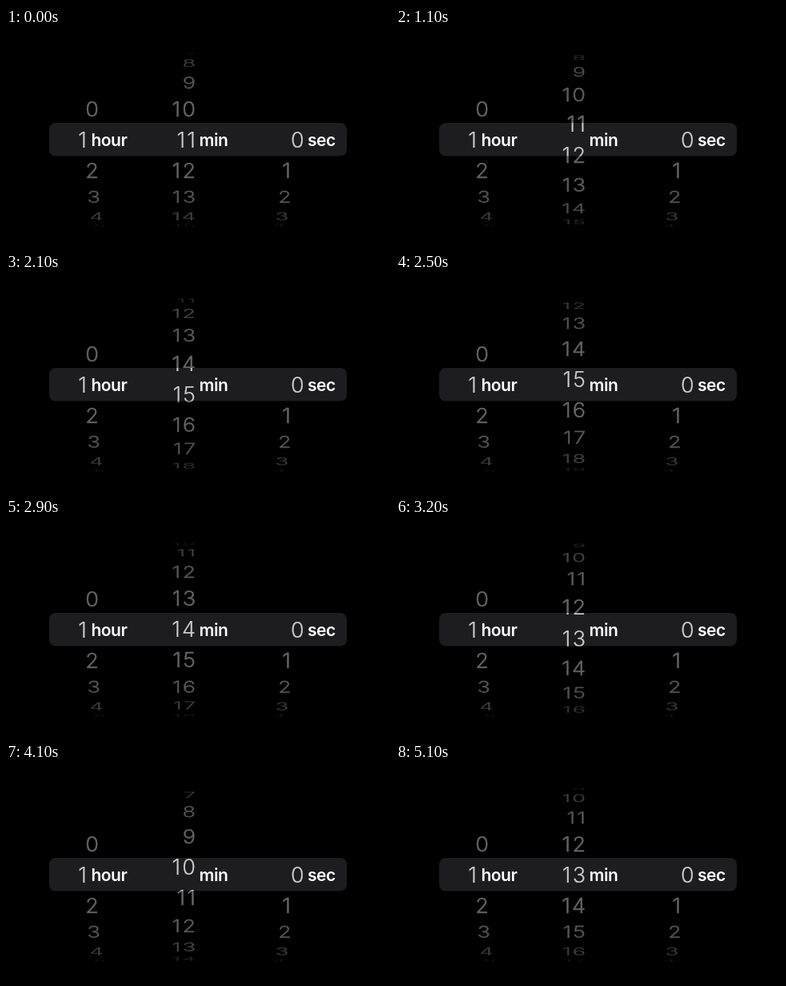
Animation, 480 px wide and 272 px high, one loop 5.2 s. Source, as an HTML page with a canvas:

```html
<!DOCTYPE html>
<html lang="en">
<head>
<meta charset="utf-8">
<title>Timer picker</title>
<style>
  html, body { margin: 0; width: 100%; height: 100%; overflow: hidden; background: #000; }
  canvas { display: block; width: 480px; height: 272px; }
</style>
</head>
<body>
<canvas id="stage" width="480" height="272"></canvas>
<script>
const ctx = document.getElementById('stage').getContext('2d');
const LOOP = 5200, STEP = 100;
const CENTER_Y = 140.2, RADIUS = 108, ROW_ANGLE = 20.9 * Math.PI / 180;
const BAND = { x: 54, y: 119, w: 372, h: 41.5, r: 8 };
const DIGIT_FONT = '300 27px Inter, sans-serif';
const LABEL_FONT = '600 21px Inter, sans-serif';
const DIGIT_GAP = 2.2, BRIGHT = 0.8;

// [time in ms, minute at the middle of the wheel, speed per second]
const scroll = [
  [1000, 11, 5], [1100, 11.5, 4], [1700, 13.26, 3], [2400, 15.25, 0], [2500, 15.18, -1.5],
  [3200, 12.73, -4.5], [3950, 10.05, 0], [4100, 10.26, 4.5], [4600, 13, 0]
];

function minuteAt(time) {
  if (time <= scroll[0][0]) return scroll[0][1];
  const next = scroll.findIndex(key => key[0] >= time);
  if (next < 0) return scroll.at(-1)[1];
  const [t0, p0, v0] = scroll[next - 1], [t1, p1, v1] = scroll[next];
  const span = t1 - t0, u = (time - t0) / span, w = 1 - u;
  return p0 * w * w * (1 + 2 * u) + p1 * u * u * (3 - 2 * u)
    + (v0 * w - v1 * u) * u * w * span / 1000;
}

function drawRow(text, angle, x, align, light) {
  const level = Math.round(255 * light);
  ctx.save();
  ctx.translate(x, CENTER_Y + RADIUS * Math.sin(angle));
  ctx.scale(1, Math.cos(angle));
  ctx.textAlign = align;
  ctx.fillStyle = ctx.strokeStyle = `rgb(${level}, ${level}, ${level})`;
  ctx.lineWidth = light < BRIGHT ? 0.5 : 0.2;
  ctx.fillText(text, 0, 9.8);
  ctx.strokeText(text, 0, 9.8);
  ctx.restore();
}

const dim = angle => 0.41 * Math.cos(angle) ** 0.7;

// Side wheels lean towards the middle as their rows recede.
function drawSideWheel(value, selectedX, rowX, lean) {
  drawRow(value, 0, selectedX, 'center', BRIGHT);
  for (let row = -value; row <= 4; row++) {
    if (!row) continue;
    const angle = row * ROW_ANGLE;
    drawRow(value + row, angle, rowX + lean * (1 - Math.cos(angle)), 'center', dim(angle));
  }
}

function drawMinutes(position, inBand) {
  ctx.save();
  ctx.letterSpacing = DIGIT_GAP + 'px';
  ctx.beginPath();
  ctx.rect(0, BAND.y, 480, BAND.h);
  if (!inBand) ctx.rect(0, 0, 480, 272);
  ctx.clip('evenodd');
  for (let n = Math.ceil(position - 4.3); n <= position + 4.3; n++) {
    const angle = (n - position) * ROW_ANGLE;
    drawRow(n, angle, 237 + DIGIT_GAP, 'right', inBand ? BRIGHT : dim(angle));
  }
  ctx.restore();
}

function drawLabels() {
  ctx.save();
  ctx.font = LABEL_FONT;
  ctx.letterSpacing = '-0.5px';
  ctx.fillStyle = '#fff';
  ctx.fillText('hour', 106.4, 148.3);
  ctx.fillText('min', 241.6, 148.3);
  ctx.fillText('sec', 377, 148.3);
  ctx.restore();
}

function draw(time) {
  ctx.fillStyle = '#000';
  ctx.fillRect(0, 0, 480, 272);
  ctx.fillStyle = '#1d1d1f';
  ctx.beginPath();
  ctx.roundRect(BAND.x, BAND.y, BAND.w, BAND.h, BAND.r);
  ctx.fill();

  ctx.font = DIGIT_FONT;
  drawSideWheel(1, 95.5, 106.8, 11.5);
  drawSideWheel(0, 364.3, 351.2, -11.5);
  const position = minuteAt(time);
  drawMinutes(position, false);
  drawMinutes(position, true);
  drawLabels();
}

const start = performance.now();
function tick() {
  const time = (performance.now() - start) % LOOP;
  draw(Math.floor(time / STEP) * STEP);
  requestAnimationFrame(tick);
}
tick();
</script>
</body>
</html>
```
